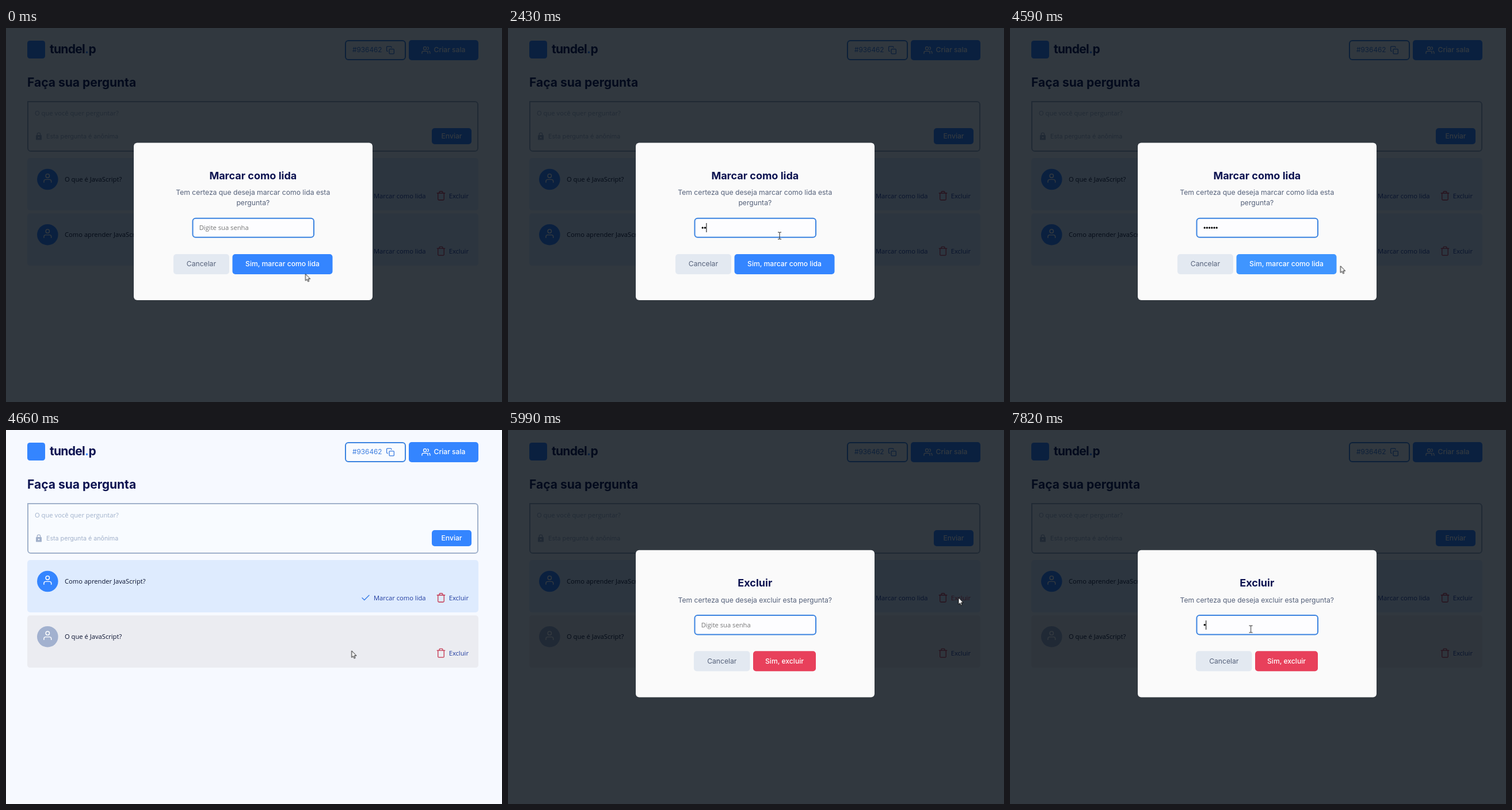
Write an HTML page that moves like this. It is 862 px wide and 650 px high and loops after 8 s.

```html
<!DOCTYPE html>
<html lang="pt">
<head>
<meta charset="utf-8">
<title>Faça sua pergunta</title>
<style>
  html, body { margin: 0; width: 100%; height: 100%; overflow: hidden; background: #f6f9ff; }
  svg { display: block; }
  #stage { width: 100%; height: 100%; }
  text { font: 400 11.2px "Open Sans", sans-serif; fill: #0a1230; white-space: pre; }
  .ui { font: 400 12.15px Inter, sans-serif; }
  .strong { font-weight: 500; }
  .mid { text-anchor: middle; }
  .title { font: 700 18px Inter, sans-serif; fill: #0c1250; text-anchor: middle; }
  .soft { fill: #55617a; }
  .white { fill: #fff; }
  .link { fill: #1f3b9f; }
  .hint { fill: #757575; }
  .icon { fill: none; stroke: currentColor; stroke-linecap: round; stroke-linejoin: round; }
  .field { fill: #fdfdff; stroke: #3b83e0; stroke-width: 2; }

  /* 1% = 80 ms */
  .step { animation: 8s step-end infinite; }
  .first { animation-name: first; }
  .second { animation-name: second; }
  .veil { animation-name: veil; }
  .dialog { animation-name: dialog; }
  @keyframes first { 0% { opacity: 1 } 58.25%, 100% { opacity: 0 } }
  @keyframes second { 0% { opacity: 0 } 58.25%, 100% { opacity: 1 } }
  @keyframes veil { 0% { opacity: 1 } 58.25% { opacity: 0 } 74.875%, 100% { opacity: 1 } }
  @keyframes dialog { 0% { opacity: 0 } 74.875%, 100% { opacity: 1 } }

  .hint1 { animation-name: hint1; }
  .hint2 { animation-name: hint2; }
  .type1 { animation-name: type1; }
  .type2 { animation-name: type2; }
  .blink1 { animation-name: blink1; }
  .blink2 { animation-name: blink2; }
  @keyframes hint1 { 0% { opacity: 1 } 25.375%, 100% { opacity: 0 } }
  @keyframes hint2 { 0% { opacity: 1 } 97.75%, 100% { opacity: 0 } }
  @keyframes type1 {
    0% { transform: none }
    25.375% { transform: translateX(4.2px) }
    30.375% { transform: translateX(8.4px) }
    33.625% { transform: translateX(12.6px) }
    36.125% { transform: translateX(16.8px) }
    41.125% { transform: translateX(21px) }
    43.75%, 100% { transform: translateX(25.2px) }
  }
  @keyframes type2 { 0% { transform: none } 97.75%, 100% { transform: translateX(4.2px) } }
  @keyframes blink1 {
    0% { opacity: 0 } 3.625% { opacity: 1 } 10.25% { opacity: 0 } 17.125% { opacity: 1 }
    23.75% { opacity: 0 } 25.375% { opacity: 1 } 50.4%, 100% { opacity: 0 }
  }
  @keyframes blink2 {
    0% { opacity: 0 } 76.3% { opacity: 1 } 82.9% { opacity: 0 } 89.5% { opacity: 1 }
    96.125% { opacity: 0 } 97.75%, 100% { opacity: 1 }
  }

  .confirm { fill: #3485ff; animation: confirm 8s linear infinite; }
  @keyframes confirm {
    0%, 2.25% { fill: #3485ff } 4.5%, 11.75% { fill: #3f95ff } 14%, 52% { fill: #3485ff }
    54.5%, 100% { fill: #3f95ff }
  }
  .remove { animation: remove 8s linear infinite; }
  @keyframes remove {
    0%, 64.5% { fill: #1f3b9f } 66.5%, 74.8% { fill: #d33a54 } 76.5%, 100% { fill: #1f3b9f }
  }

  .pointer { animation: move 8s linear infinite; }
  @keyframes move {
    0%, .875% { transform: translate(520.5px, 427.5px) }
    5% { transform: translate(530px, 408px) }
    10.25% { transform: translate(520px, 400px) }
    15.4%, 17.1% { transform: translate(490px, 363px) }
    20.4%, 22.25% { transform: translate(492px, 361px) }
    25.375%, 48.75% { transform: translate(472px, 361px) }
    52.1% { transform: translate(520px, 395px) }
    54.75%, 56.6% { transform: translate(556px, 411px) }
    57.375% { transform: translate(574px, 414px) }
    58.25% { transform: translate(600.3px, 384px) }
    61.25% { transform: translate(700px, 310px) }
    66.1% { transform: translate(790px, 297px) }
    68.75% { transform: translate(802px, 299px) }
    72.25%, 74.8% { transform: translate(787.5px, 292px) }
    74.875%, 75.7% { transform: translate(783px, 291.5px) }
    83.5%, 85.25% { transform: translate(402px, 357px) }
    89.5%, 100% { transform: translate(418.5px, 346px) }
  }
  .arrow { animation-name: arrow; }
  .hand { animation-name: hand; }
  .beam { animation-name: beam; }
  @keyframes arrow {
    0% { opacity: 1 } 2.25% { opacity: 0 } 11.75% { opacity: 1 } 22.25% { opacity: 0 }
    49.4% { opacity: 1 } 52% { opacity: 0 } 56.6% { opacity: 1 } 64.5% { opacity: 0 }
    74.875% { opacity: 1 } 86%, 100% { opacity: 0 }
  }
  @keyframes hand {
    0% { opacity: 0 } 2.25% { opacity: 1 } 11.75% { opacity: 0 } 52% { opacity: 1 }
    56.6% { opacity: 0 } 64.5% { opacity: 1 } 74.875%, 100% { opacity: 0 }
  }
  @keyframes beam {
    0% { opacity: 0 } 22.25% { opacity: 1 } 49.4% { opacity: 0 } 86%, 100% { opacity: 1 }
  }
</style>
</head>
<body>
<svg id="stage" viewBox="0 0 862 650">
  <defs>
    <g id="user" class="icon" stroke-width="1.8">
      <path d="M20 21v-2a4 4 0 0 0-4-4H8a4 4 0 0 0-4 4v2"/><circle cx="12" cy="7" r="4"/>
    </g>
    <g id="users" class="icon" stroke-width="2">
      <path d="M17 21v-2a4 4 0 0 0-4-4H5a4 4 0 0 0-4 4v2M23 21v-2a4 4 0 0 0-3-3.87M16 3.13a4 4 0 0 1 0 7.75"/>
      <circle cx="9" cy="7" r="4"/>
    </g>
    <g id="copy" class="icon" stroke-width="2">
      <rect x="9" y="9" width="13" height="13" rx="2"/>
      <path d="M5 15H4a2 2 0 0 1-2-2V4a2 2 0 0 1 2-2h9a2 2 0 0 1 2 2v1"/>
    </g>
    <path id="check" class="icon" stroke-width="1.9" d="M20 6L9 17L4 12"/>
    <path id="trash" class="icon" stroke-width="1.7" d="M3 6h18M19 6v14a2 2 0 0 1-2 2H7a2 2 0 0 1-2-2V6M8 6V4a2 2 0 0 1 2-2h4a2 2 0 0 1 2 2v2"/>
    <!-- card parts, relative to the top of a card -->
    <rect id="card" x="37" width="784" height="91" rx="5"/>
    <g id="avatar">
      <circle cx="72.3" cy="37" r="18.3"/>
      <use href="#user" transform="translate(62.7 25.4) scale(.8)" color="#fff"/>
    </g>
    <g id="mark">
      <use href="#check" transform="translate(616 56.8) scale(.75)" color="#3a7fe8"/>
      <text class="link" x="639" y="69.6">Marcar como lida</text>
    </g>
    <use id="bin" href="#trash" transform="translate(747 56.5) scale(.75)" color="#c4314b"/>
  </defs>

  <rect width="862" height="650" fill="#f6f9ff"/>

  <rect x="37" y="22" width="31" height="31" rx="4.5" fill="#3485ff"/>
  <text x="76" y="43.5" style="font:700 21px Inter,sans-serif;letter-spacing:-.7px;fill:#0c1250">tundel<tspan fill="#3485ff">.</tspan>p</text>

  <rect x="590" y="22" width="104" height="33" rx="5" fill="#f8fbff" stroke="#3b83e0" stroke-width="2"/>
  <text class="ui" x="602" y="42.3" style="fill:#3b7de0;font-size:11.8px">#936462</text>
  <use href="#copy" transform="translate(660.3 30.8) scale(.64)" color="#3b7de0"/>
  <rect x="700" y="21" width="121" height="35" rx="5" fill="#3485ff"/>
  <use href="#users" transform="translate(722.3 30.8) scale(.64)" color="#fff"/>
  <text class="ui strong white" x="743.5" y="42.3">Criar sala</text>

  <text class="ui" x="37" y="102" style="font-size:21px;font-weight:700;fill:#0c1250">Faça sua pergunta</text>

  <path d="M38 128H815a5 5 0 0 1 5 5V209a5 5 0 0 1-5 5H43a5 5 0 0 1-5-5Z" fill="#f8fbff" stroke="#a0b1cb" stroke-width="2"/>
  <text x="50" y="151.8" style="fill:#9fb0ca">O que você quer perguntar?</text>
  <g fill="#a2b1cb">
    <rect x="52" y="186" width="10" height="8.6" rx="1.2"/>
    <path d="M54.3 186.5V184.8a2.7 2.7 0 0 1 5.4 0V186.5" fill="none" stroke="#a2b1cb" stroke-width="1.3"/>
    <circle cx="57" cy="190.2" r="1.2" fill="#f6f9ff"/>
  </g>
  <text class="ui" x="70" y="192.2" style="font-size:10.7px;fill:#a2b1cb">Esta pergunta é anônima</text>
  <rect x="740" y="174" width="69" height="28" rx="5" fill="#3485ff"/>
  <text class="ui strong white mid" x="774.5" y="192.3">Enviar</text>

  <!-- first card -->
  <g transform="translate(0 226)">
    <use href="#card" fill="#deebfe"/>
    <use href="#avatar" fill="#3485ff"/>
    <text class="step first" x="102" y="41">O que é JavaScript?</text>
    <text class="step second" x="102" y="41">Como aprender JavaScript?</text>
    <use href="#mark"/>
    <use href="#bin"/>
    <text class="link remove" x="769.7" y="69.6">Excluir</text>
  </g>

  <!-- second card -->
  <g transform="translate(0 322.2)">
    <g class="step first">
      <use href="#card" fill="#deebfe"/>
      <use href="#avatar" fill="#3485ff"/>
      <text x="102" y="41">Como aprender JavaScript?</text>
      <use href="#mark"/>
    </g>
    <g class="step second">
      <use href="#card" fill="#ebecf1"/>
      <use href="#avatar" fill="#a2b1cf"/>
      <text x="102" y="41">O que é JavaScript?</text>
    </g>
    <use href="#bin"/>
    <text class="link" x="769.7" y="69.6">Excluir</text>
  </g>

  <rect class="step veil" width="862" height="650" fill="rgb(0 8 16 / .8)"/>

  <g class="step first">
    <rect x="222" y="199.5" width="415" height="273.5" rx="6" fill="#fafafa"/>
    <text class="title" x="429.3" y="263">Marcar como lida</text>
    <text class="ui soft mid" x="429.3" y="290.3">Tem certeza que deseja marcar como lida esta</text>
    <text class="ui soft mid" x="429.3" y="308">pergunta?</text>
    <rect class="field" x="324.5" y="330.8" width="210.5" height="33" rx="5"/>
    <path d="M338.2 347.2h22" stroke="#000" stroke-width="3.3" stroke-linecap="round" stroke-dasharray="0 4.2"/>
    <g class="step type1">
      <rect x="336" y="340" width="30" height="15" fill="#fdfdff"/>
      <rect class="step blink1" x="336" y="339" width="1" height="16"/>
    </g>
    <text class="hint step hint1" x="335.7" y="351.4">Digite sua senha</text>
    <rect x="291" y="393" width="97" height="35" rx="5" fill="#e3e9f1"/>
    <text class="ui soft mid" x="339.4" y="414.3">Cancelar</text>
    <rect class="confirm" x="393.5" y="393" width="174" height="35" rx="5"/>
    <text class="ui strong white mid" x="480.5" y="414.3">Sim, marcar como lida</text>
  </g>

  <g class="step dialog">
    <rect x="222" y="208.7" width="415" height="255.8" rx="6" fill="#fafafa"/>
    <text class="title" x="429.3" y="272">Excluir</text>
    <text class="ui soft mid" x="429.3" y="299.6">Tem certeza que deseja excluir esta pergunta?</text>
    <rect class="field" x="324.5" y="322" width="210.5" height="33.5" rx="5"/>
    <circle cx="338.2" cy="338.7" r="1.65"/>
    <g class="step type2">
      <rect x="336" y="331" width="8" height="16" fill="#fdfdff"/>
      <rect class="step blink2" x="336" y="331" width="1" height="16"/>
    </g>
    <text class="hint step hint2" x="335.7" y="342.9">Digite sua senha</text>
    <rect x="323" y="384.3" width="97.5" height="35" rx="5" fill="#e3e9f1"/>
    <text class="ui soft mid" x="371.8" y="405.7">Cancelar</text>
    <rect x="426" y="384.3" width="109" height="35" rx="5" fill="#e8405b"/>
    <text class="ui strong white mid" x="480.5" y="405.7">Sim, excluir</text>
  </g>

  <g class="pointer" stroke="#000" stroke-linejoin="round" fill="#fff">
    <path class="step arrow" stroke-width=".9" d="M0 0V11.6L2.6 9.2L4.4 13.2L6.2 12.4L4.5 8.5H8.2Z"/>
    <path class="step hand" stroke-width=".9" d="M-1.2 9.5V1a1.2 1.2 0 0 1 2.4 0V5.5Q2.6 4.6 3.5 5.9Q4.9 5.2 5.6 6.4Q7.4 6 7.4 7.9V11Q7.4 13.2 6 15.8H-.6Q-1.4 13.4-3.6 10.8Q-4.6 9-3.4 8.4Q-2.3 8.1-1.2 9.5ZM1.2 5.5V8.3M3.5 5.9V8.4M5.6 6.4V8.6"/>
    <path class="step beam" fill="none" stroke-width="1" stroke="#222" d="M-3-6H-1Q0-6 0-5Q0-6 1-6H3M0-5V5M-3 6H-1Q0 6 0 5Q0 6 1 6H3"/>
  </g>
</svg>
</body>
</html>
```
